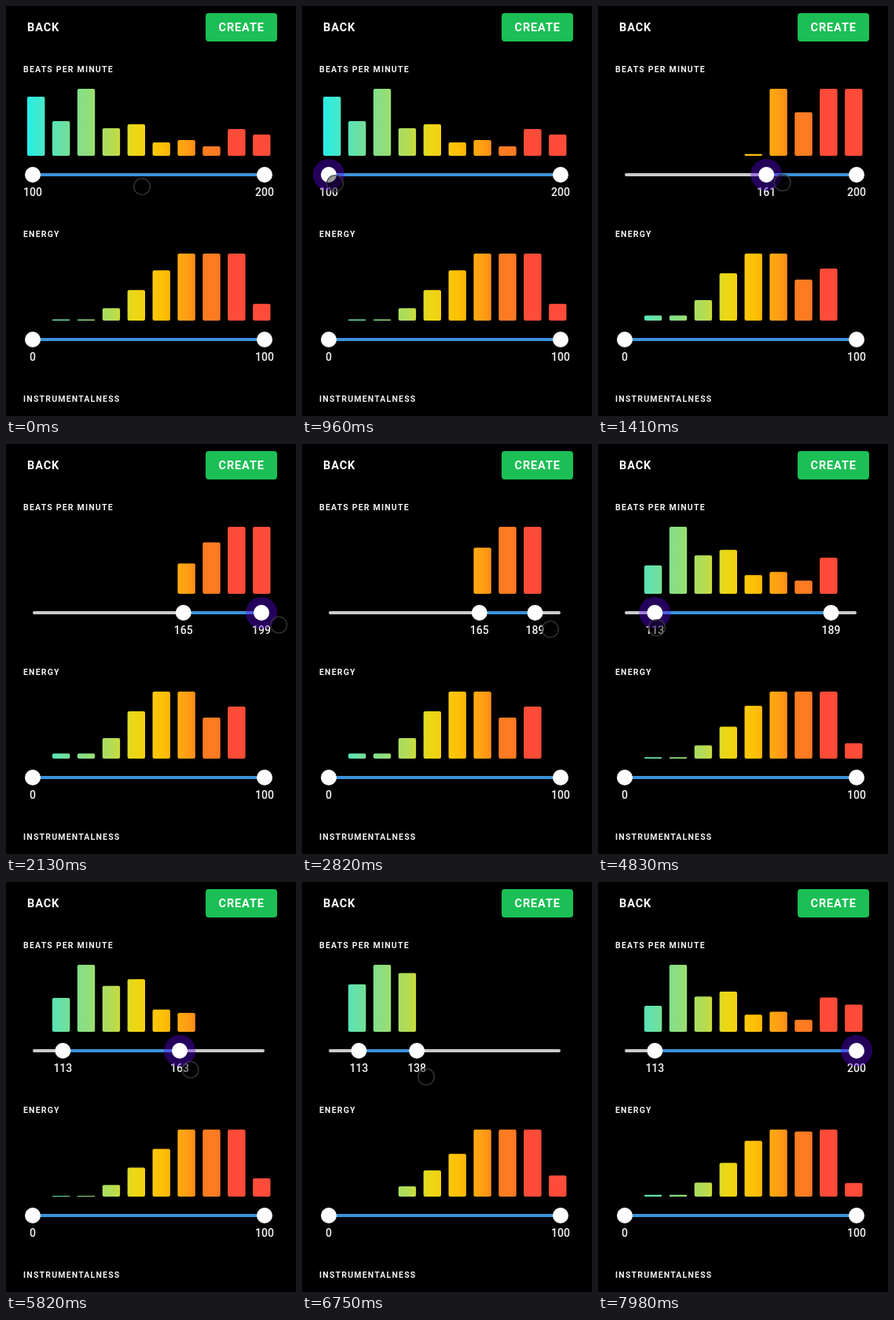
Animation of 369x520 px, one loop 8 s. Source, as an HTML page:

```html
<!DOCTYPE html>
<html lang="en">
<head>
<meta charset="utf-8">
<title>Playlist filters</title>
<style>
html, body { margin: 0; width: 100%; height: 100%; overflow: hidden; background: #000; }
svg { display: block; font-family: Roboto, sans-serif; fill: #f2f2f2; }
.title { font-size: 10.5px; font-weight: 700; letter-spacing: 1.2px; }
.action { font-size: 14.5px; font-weight: 700; letter-spacing: .9px; fill: #fff; }
.value { font-size: 14px; font-weight: 500; text-anchor: middle; }
</style>
</head>
<body>
<svg id="stage" width="369" height="520" viewBox="0 0 369 520">
  <defs>
    <linearGradient id="hues" gradientUnits="userSpaceOnUse" x1="27" y1="0" x2="337" y2="0">
      <stop offset="0" stop-color="#26f0e6"/>
      <stop offset=".14" stop-color="#68e0a6"/>
      <stop offset=".345" stop-color="#b4dc55"/>
      <stop offset=".44" stop-color="#ebd815"/>
      <stop offset=".55" stop-color="#ffc106"/>
      <stop offset=".65" stop-color="#ffa013"/>
      <stop offset=".72" stop-color="#ff7e22"/>
      <stop offset=".8" stop-color="#ff7822"/>
      <stop offset=".83" stop-color="#ff4c38"/>
    </linearGradient>
  </defs>
  <text class="action" x="27" y="32">BACK</text>
  <rect x="254" y="9" width="91" height="36" rx="4" fill="#1bbf55"/>
  <text class="action" x="270.5" y="32">CREATE</text>
  <text class="title" x="22" y="84">BEATS PER MINUTE</text>
  <text class="title" x="22" y="293">ENERGY</text>
  <text class="title" x="22" y="502">INSTRUMENTALNESS</text>
</svg>
<script>
const LOOP = 8000, MAX_H = 85, LEFT = 34, SPAN = 295;
const stage = document.getElementById('stage');

function add(tag, attrs) {
  const el = document.createElementNS('http://www.w3.org/2000/svg', tag);
  set(el, attrs);
  return stage.appendChild(el);
}
function set(el, attrs) {
  for (const k in attrs) el.setAttribute(k, attrs[k]);
}

// Tracks per 10 BPM from 100 to 200
const counts = [75, 44, 126, 35, 40, 17, 20, 12, 34, 27];
const sum = list => list.reduce((a, b) => a + b);
const TOTAL = sum(counts);

// Energy histograms of slow (125 BPM) and fast (180 BPM) selections
const slow = [0, 0, 0, 13, 33, 54, 110, 100, 96, 27];
const fast = [0, 6.5, 6.5, 26, 60, 100, 110, 52, 66, 0];

// Tracks of each bin inside low..high; they bunch at the bin's lower end
function selected(low, high) {
  const below = (v, i) => 1 - (1 - Math.min(1, Math.max(0, (v - 100) / 10 - i))) ** 1.5;
  return counts.map((n, i) => n * (below(high, i) - below(low, i)));
}

const drags = [
  { knob: 0, press: 960, from: 960, until: 1490, release: 1560, to: 165 },
  { knob: 1, press: 1950, from: 1980, until: 2670, release: 2730, to: 189 },
  { knob: 0, press: 3900, from: 4020, until: 4800, release: 4890, to: 113 },
  { knob: 1, press: 5460, from: 5490, until: 6150, release: 6600, to: 138 },
  { knob: 1, press: 7530, from: 7530, until: 7950, release: LOOP, to: 200 }
];

const pointerPath = [[300, 173, 229], [900, 42, 225], [960, 42, 225], [1490, 247, 224],
  [1890, 350, 228], [1980, 350, 229], [2820, 316, 235], [3060, 298, 233], [3270, 298, 233],
  [3450, 268, 269], [3630, 237, 231], [4020, 237, 231], [4800, 75, 233], [4890, 75, 233],
  [5430, 309, 236], [5490, 309, 236], [6150, 161, 240], [6510, 161, 240], [6750, 158, 247],
  [7140, 158, 247], [7380, 157, 201], [7530, 157, 203], [7950, 384, 216]];

function ease(t, from, until) {
  const u = Math.min(1, Math.max(0, (t - from) / (until - from)));
  return u * u * (3 - 2 * u);
}
const mix = (a, b, u) => a + (b - a) * u;

function valuesAt(t) {
  const values = [100, 200];
  for (const { knob, from, until, to } of drags)
    values[knob] = mix(values[knob], to, ease(t, from, until));
  return values;
}

function pointerAt(t) {
  let [time, x, y] = pointerPath[0];
  for (const [next, nx, ny] of pointerPath.slice(1)) {
    const u = ease(t, time, next);
    x = mix(x, nx, u);
    y = mix(y, ny, u);
    time = next;
  }
  return { cx: x, cy: y };
}

function makePanel(base, min, max) {
  const y = base + 24;
  const bars = counts.map((_, i) =>
    add('rect', { x: 27 + 31.9 * i, width: 22.4, fill: 'url(#hues)' }));
  const line = { y1: y, y2: y, 'stroke-width': 4 };
  add('line', { ...line, x1: LEFT + 2, x2: LEFT + SPAN - 2, stroke: '#cbcbcb', 'stroke-linecap': 'round' });
  const range = add('line', { ...line, stroke: '#3c92d8' });
  const ends = [0, 1].map(() => ({
    label: add('text', { class: 'value', y: base + 51 }),
    halo: add('circle', { cy: y, r: 20, fill: '#6200ee', 'fill-opacity': .38 }),
    knob: add('circle', { cy: y, r: 10, fill: '#fff' })
  }));

  return (heights, values, held = []) => {
    heights.forEach((h, i) => {
      const height = Math.min(MAX_H, Math.max(0, h));
      set(bars[i], { y: base - height, height, rx: Math.min(2, height / 2) });
    });
    const xs = values.map(v => LEFT + (v - min) / (max - min) * SPAN);
    set(range, { x1: xs[0], x2: xs[1] });
    ends.forEach(({ label, halo, knob }, i) => {
      set(label, { x: xs[i] });
      set(halo, { cx: xs[i], visibility: held[i] ? 'visible' : 'hidden' });
      set(knob, { cx: xs[i] });
      label.textContent = Math.round(values[i]);
    });
  };
}

const drawTempo = makePanel(190, 100, 200), drawEnergy = makePanel(399, 0, 100);
const pointer = add('circle', { r: 10.4, fill: '#000', 'fill-opacity': .4, stroke: '#3c3c3c',
  'stroke-opacity': .85, 'stroke-width': 1.4 });

function draw(t) {
  // Bars follow the knobs with a slight delay
  const tracks = selected(...valuesAt(t - 20)), total = sum(tracks);
  const meanTempo = sum(tracks.map((n, i) => n * (105 + 10 * i))) / total;
  const speed = Math.min(1, (meanTempo - 125) / 55);
  const held = [0, 1].map(k => drags.some(d => d.knob === k && t >= d.press && t < d.release));

  drawTempo(tracks.map(n => n * TOTAL / total), valuesAt(t), held);
  drawEnergy(slow.map((h, i) => mix(h, fast[i], speed)), [0, 100]);
  set(pointer, { ...pointerAt(t), visibility: t >= 120 && t < 300 ? 'hidden' : 'visible' });
}

const start = performance.now();
function tick() {
  draw((performance.now() - start) % LOOP);
  requestAnimationFrame(tick);
}
tick();
</script>
</body>
</html>
```
